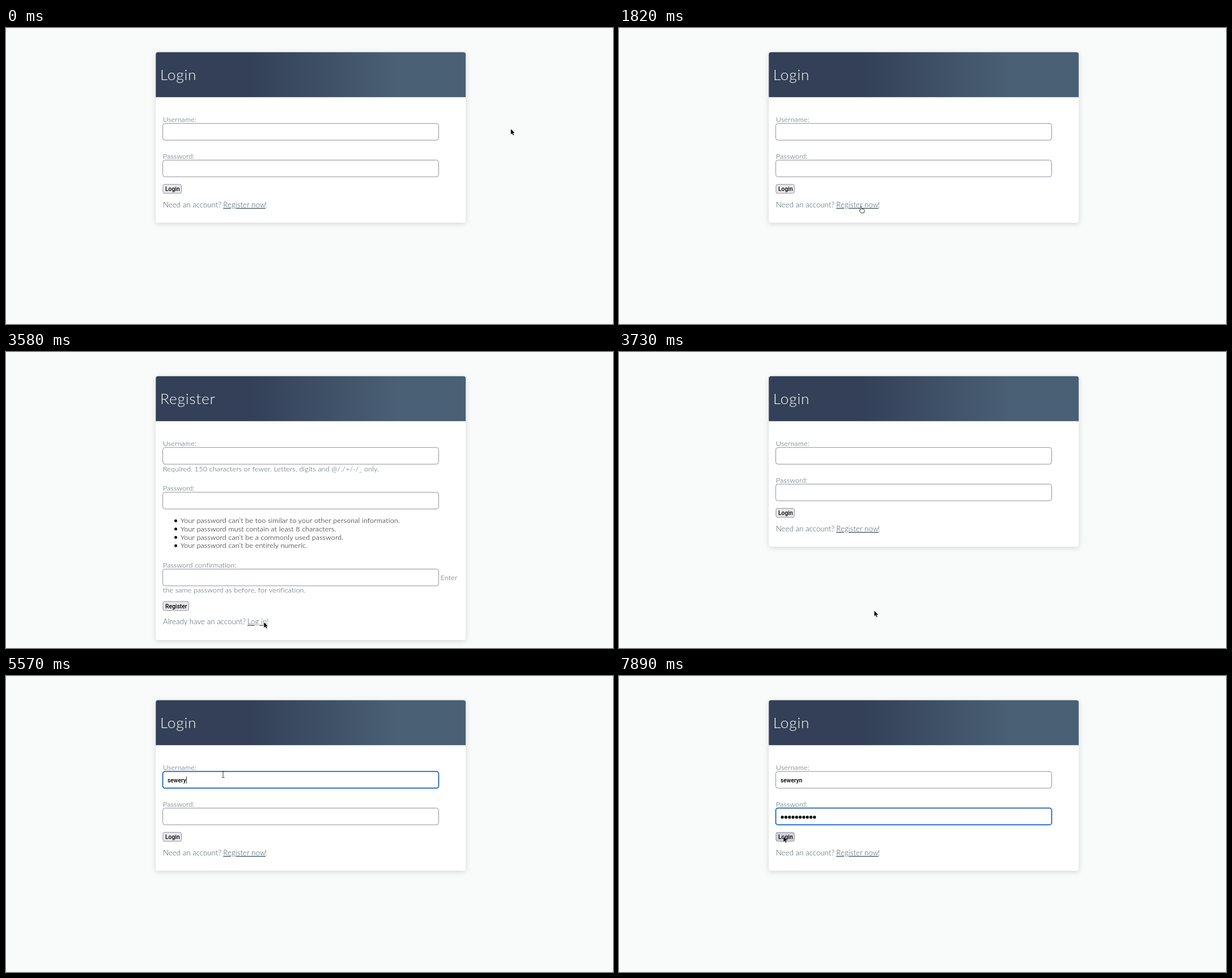
Recreate the animation shown at these times as an HTML page. Size 1071x523 px, loop 8 s.

```html
<!DOCTYPE html>
<html lang="en">
<head>
<meta charset="utf-8">
<title>Login and register</title>
<style>
html, body { margin: 0; width: 100%; height: 100%; overflow: hidden; background: #f9fbfb; }
svg { display: block; width: 1071px; height: 523px; }
text { font: 300 12.5px Lato, sans-serif; letter-spacing: .18px; fill: #40545d; white-space: pre; }
.title { font-size: 26.4px; letter-spacing: .75px; fill: #fff; }
.dark { fill: #000; }
.prompt, .link { font-size: 13.2px; letter-spacing: .08px; }
.link { text-decoration: underline; }
.ui { font: 500 10.3px Roboto, sans-serif; letter-spacing: 0; fill: #000; }
.card { fill: #fff; filter: drop-shadow(0 2px 5px rgba(0, 0, 0, .15)); }
.field { fill: #fff; stroke: #8f8f9d; }
.focus { stroke: #1a62bd; stroke-width: 1.8; }
.button { fill: #e9e9ed; stroke: #8f8f9d; }
.hover { fill: #d0d0d7; }
</style>
</head>
<body>
<svg id="stage" viewBox="0 0 1071 523">
  <defs>
    <linearGradient id="head">
      <stop offset=".3" stop-color="#334057"/>
      <stop offset=".78" stop-color="#4a6074"/>
    </linearGradient>
  </defs>
  <g id="login"></g>
  <g id="register"></g>
  <text id="name" class="ui" x="285" y="188"></text>
  <g id="dots"></g>
  <path id="caret" stroke="#333"/>
  <g id="pointer">
    <path id="arrow" d="M0 0V10.6L2.5 8.4L4.2 12L6 11.2L4.4 7.7H7.6Z" fill="#000" stroke="#fff" stroke-width=".6"/>
    <path id="hand" d="M-1 1Q0 -.6 1 1V5L5.3 6Q6.3 6.4 6 8L5.2 12.3H-.2L-3 8Q-3.4 6.4 -1 7.4Z" fill="#fff" stroke="#222" stroke-width=".9"/>
    <path id="beam" d="M-2.5 -5.5H-.7L0 -5L.7 -5.5H2.5M0 -5V5M-2.5 5.5H-.7L0 5L.7 5.5H2.5" fill="none" stroke="#222" stroke-width=".9"/>
  </g>
</svg>
<script>
const $ = id => document.getElementById(id);
const LOOP = 8000;
const USER = 'seweryn';

function add(parent, tag, attrs, content = '') {
  const el = document.createElementNS('http://www.w3.org/2000/svg', tag);
  for (const k in attrs) el.setAttribute(k, attrs[k]);
  el.textContent = content;
  parent.append(el);
  return el;
}
const label = (g, x, y, str, cls = '') => add(g, 'text', { x, y, class: cls }, str);
const field = (g, y) => add(g, 'rect', { x: 276.6, y, width: 486.8, height: 29.5, rx: 4, class: 'field' });

function card(g, title, height) {
  add(g, 'rect', { x: 264.3, y: 43, width: 546.8, height, rx: 4, class: 'card' });
  add(g, 'path', { d: 'M264.3 122.3V46.8q0-4 4-4H807.1q4 0 4 4V122.3Z', fill: 'url(#head)' });
  label(g, 272, 92, title, 'title');
  label(g, 277, 166, 'Username:');
}
function button(g, y, width, str) {
  const box = add(g, 'rect', { x: 277, y, width, height: 15.8, rx: 3, class: 'button' });
  label(g, 281, y + 11.9, str, 'ui');
  return box;
}
function prompt(g, y, question, link, linkX, endX) {
  label(g, 277, y, question, 'prompt');
  label(g, linkX, y, link, 'link');
  label(g, endX, y, '!', 'prompt');
}

const login = $('login'), register = $('register');
card(login, 'Login', 301);
const loginUser = field(login, 168.7);
label(login, 277, 230.5, 'Password:');
const loginPass = field(login, 233.4);
const loginButton = button(login, 276.3, 32.4, 'Login');
prompt(login, 317, 'Need an account?', 'Register now', 383.3, 457);

card(register, 'Register', 466);
const registerUser = field(register, 168.7);
label(register, 277, 210.5, 'Required. 150 characters or fewer. Letters, digits and @/./+/-/_ only.');
label(register, 277, 245, 'Password:');
field(register, 247.9);
['Your password can’t be too similar to your other personal information.',
 'Your password must contain at least 8 characters.',
 'Your password can’t be a commonly used password.',
 'Your password can’t be entirely numeric.'].forEach((str, i) => {
  const y = 302.2 + i * 14.65;
  add(register, 'circle', { cx: 299.5, cy: y - 4, r: 2.5 });
  label(register, 308, y, str, 'dark');
});
label(register, 277, 381, 'Password confirmation:');
field(register, 383.6);
label(register, 766.5, 402.5, 'Enter');
label(register, 277, 425, 'the same password as before, for verification.');
button(register, 440.9, 45.4, 'Register');
prompt(register, 481.3, 'Already have an account?', 'Log in', 426, 460.3);

for (let i = 0; i < 10; i++) add($('dots'), 'circle', { cx: 288.2 + i * 6.3, cy: 249.4, r: 2.6 });

const nameKeys = [5010, 5100, 5190, 5290, 5470, 5560, 5650];
const passKeys = [6130, 6310, 6375, 6440, 6590, 6680, 6770, 6970, 7110, 7280];

// Pointer moves: start, end, target x, target y
const moves = [
  [850, 1640, 427, 314.5],
  [2430, 2840, 397, 423.5],
  [2840, 3220, 455, 477],
  [3630, 4270, 383, 174],
  [7510, 7850, 290, 283]
];
// Hot zones: x, y, width, height, pointer shape
const loginZones = [
  [383, 306, 74, 14, 'hand'], [277, 306, 184, 14, 'beam'],
  [277, 169, 487, 30, 'beam'], [277, 233, 487, 30, 'beam'],
  [277, 155, 61, 13, 'beam'], [277, 220, 57, 13, 'beam']
];
const registerZones = [
  [426, 470, 34, 14, 'hand'], [277, 470, 186, 14, 'beam'],
  [277, 414, 253, 14, 'beam'], [277, 384, 487, 30, 'beam'],
  [308, 291, 225, 58, 'beam'], [277, 370, 129, 13, 'beam']
];

const within = (t, a, b) => t >= a && t < b;
const count = (keys, t) => keys.filter(k => t >= k).length;
const show = (el, on) => el.setAttribute('visibility', on ? 'visible' : 'hidden');

function pointerAt(t) {
  let x = 890.5, y = 178;
  for (const [a, b, tx, ty] of moves) {
    const p = Math.min(1, Math.max(0, (t - a) / (b - a)));
    const e = p * p * (3 - 2 * p);
    x += (tx - x) * e;
    y += (ty - y) * e;
  }
  return [x, y];
}

function draw(t) {
  const onRegister = within(t, 1870, 3630);
  login.style.display = onRegister ? 'none' : '';
  register.style.display = onRegister ? '' : 'none';

  registerUser.classList.toggle('focus', t < 3500);
  loginUser.classList.toggle('focus', within(t, 4290, 5900));
  loginPass.classList.toggle('focus', t >= 5900);

  const name = $('name');
  name.textContent = USER.slice(0, count(nameKeys, t));
  const typed = count(passKeys, t);
  [...$('dots').children].forEach((dot, i) => show(dot, i < typed));

  const inPass = t >= 5900;
  const caretX = inPass ? 285.5 + typed * 6.3 : 285.5 + name.getComputedTextLength();
  $('caret').setAttribute('d', `M${Math.floor(caretX) + .5} ${inPass ? 242 : 177.5}v12.5`);
  show($('caret'), [[1870, 2430], [2830, 3500], [4370, 4650], [5010, 7780]].some(([a, b]) => within(t, a, b)));

  const [x, y] = pointerAt(t);
  const zone = (onRegister ? registerZones : loginZones)
    .find(([zx, zy, w, h]) => within(x, zx, zx + w) && within(y, zy, zy + h));
  const shape = zone && !within(t, 3300, 3630) ? zone[4] : 'arrow';
  for (const id of ['arrow', 'hand', 'beam']) show($(id), id === shape);
  $('pointer').setAttribute('transform', `translate(${x} ${y})`);
  loginButton.classList.toggle('hover', within(x, 277, 310) && within(y, 276, 293));
}

const start = performance.now();
function tick(now) {
  draw(Math.max(0, now - start) % LOOP);
  requestAnimationFrame(tick);
}
draw(0);
requestAnimationFrame(tick);
</script>
</body>
</html>
```
